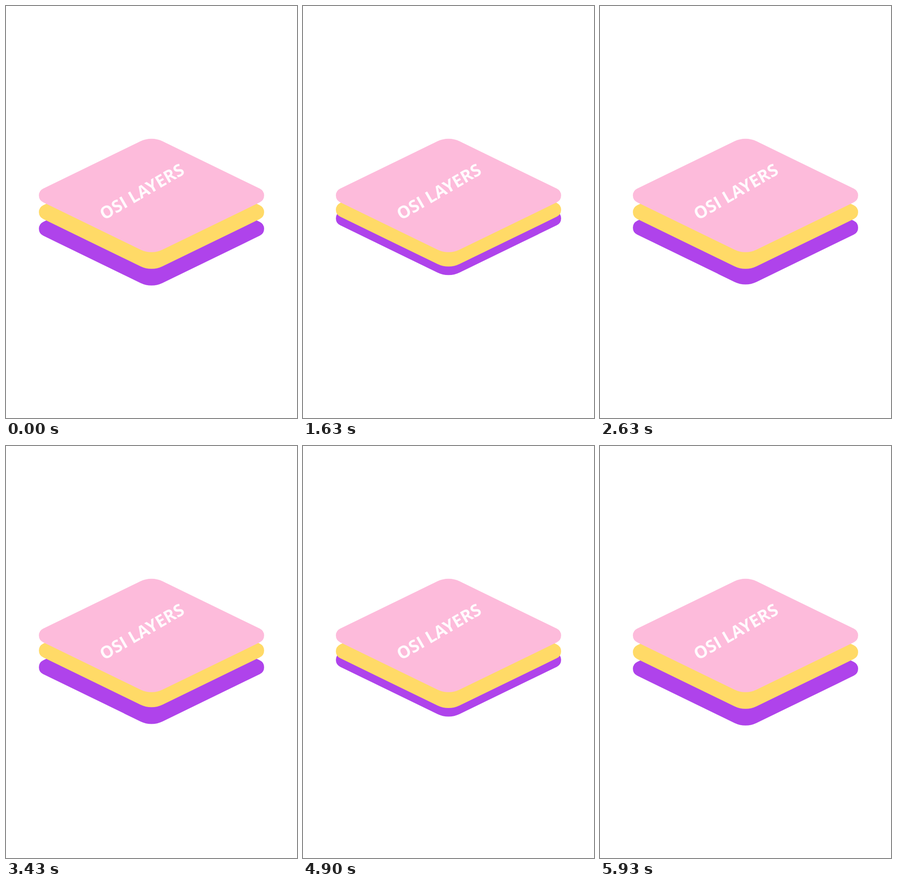
These frames come from a looping animation (629 px wide and 890 px high, 6010 ms). An HTML page:

```html
<!DOCTYPE html>
<html lang="en">
<head>
<meta charset="utf-8">
<title>Layers</title>
<style>
  html, body { margin: 0; width: 100%; height: 100%; overflow: hidden; background: #fff; }
  svg { display: block; width: 629px; height: 890px; }
  text { font: 700 36.8px "Open Sans", "Noto Sans", sans-serif; text-anchor: middle; fill: #fffafd; }
</style>
</head>
<body>
<svg viewBox="0 0 629 890">
  <defs>
    <!-- flat diamond: wide arcs above and below, tight ones at the sides -->
    <path id="tile" transform="translate(314.5 409.3)"
          d="M-234.2 -14.8 L-24 -117 A55 55 0 0 1 24 -117
             L234.2 -14.8 A16.5 16.5 0 0 1 234.2 14.8
             L24 117 A55 55 0 0 1 -24 117
             L-234.2 14.8 A16.5 16.5 0 0 1 -234.2 -14.8 Z"/>
  </defs>
  <use id="low" href="#tile" fill="#af43eb"/>
  <use id="mid" href="#tile" fill="#ffda67"/>
  <use href="#tile" fill="#fdbbdb"/>
  <text transform="translate(293.5 401) rotate(-30)" y="13.2">OSI LAYERS</text>
</svg>
<script>
  const LOOP = 6010, CYCLE = 3, LAST = 119;

  // gap: resting distance, lift: travel upward, start/half: seconds of the rise
  const layers = [
    { id: "low", gap: 72, lift: 23, start: 0.09, half: 1.43 },
    { id: "mid", gap: 36, lift: 10, start: 0, half: 1.1 }
  ].map(layer => ({ ...layer, node: document.getElementById(layer.id) }));

  // Rises and falls once with a sine ease, then rests
  function bump(s, start, half) {
    const u = Math.min(2, Math.max(0, (s - start) / half));
    return (1 - Math.cos(Math.PI * u)) / 2;
  }

  // Steps alternate between 30 and 70 ms, each one 1/20 s of motion
  function seconds(ms) {
    const step = Math.floor(ms / 100) * 2 + (ms % 100 >= 30 ? 1 : 0);
    return Math.min(step, LAST) / 20;
  }

  function draw(ms) {
    const s = seconds(ms) % CYCLE;
    for (const { node, gap, lift, start, half } of layers) {
      const y = gap - lift * bump(s, start, half);
      node.setAttribute("transform", `translate(0 ${y.toFixed(2)})`);
    }
  }

  const begin = performance.now();
  function tick() {
    draw((performance.now() - begin) % LOOP);
    requestAnimationFrame(tick);
  }
  tick();
</script>
</body>
</html>
```
